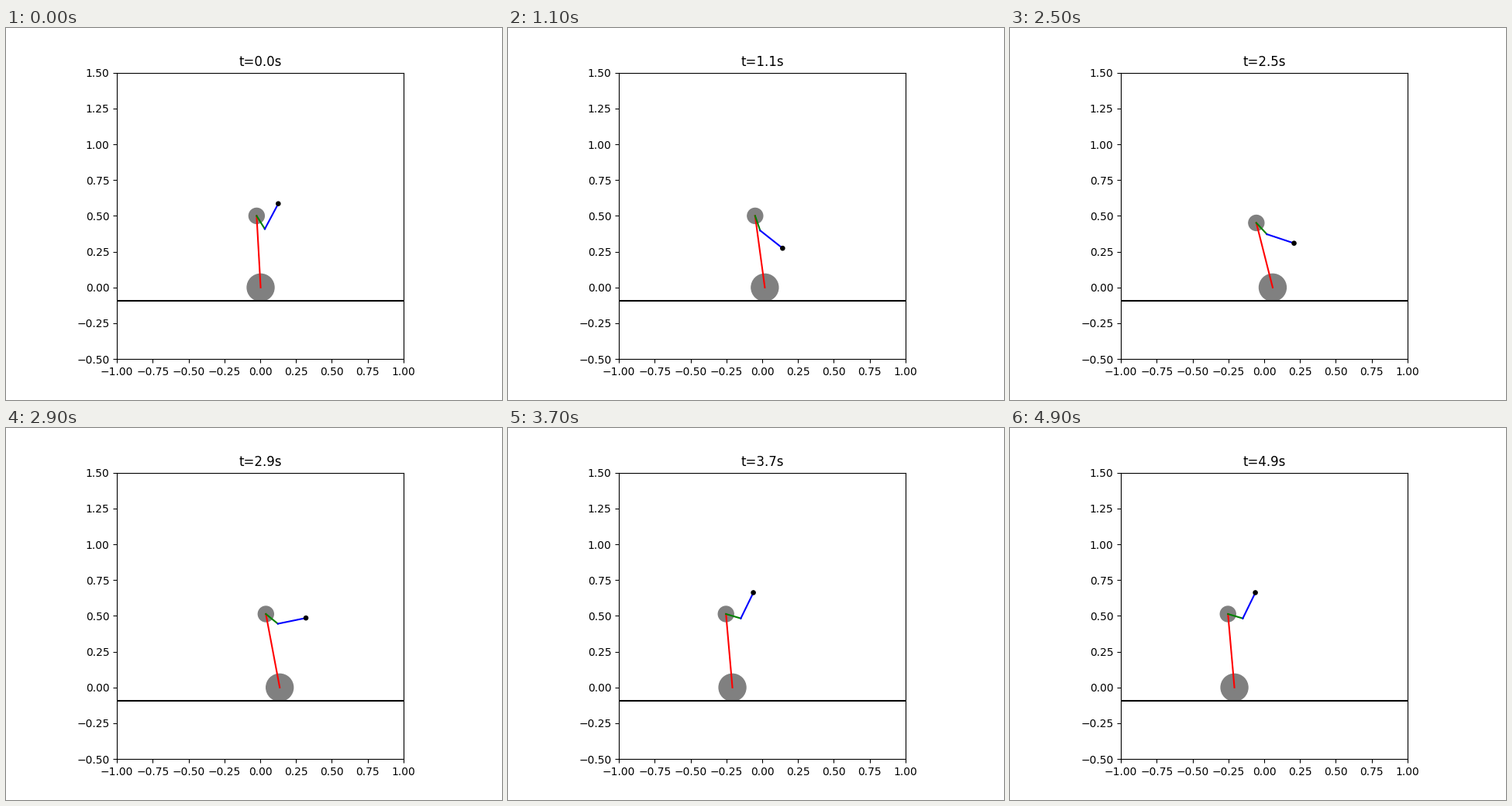
These frames come from a looping animation (640 px wide and 480 px high, 5 s). A matplotlib script:

```python
import numpy as np
import matplotlib.pyplot as plt
from matplotlib.animation import FuncAnimation
from matplotlib.patches import Circle

FRAMES, INTERVAL = 50, 100
WHEEL_R, HIP_R, HAND_R = 0.0945, 0.054, 0.014
LINK, ARM = 0.108, 0.2


def swing(*turns):
    """Motion that eases in and out between (time, value) turning points."""
    times, values = zip(*turns)

    def at(t):
        step = np.interp(t, times, range(len(times)))
        i, u = divmod(step, 1)
        return np.interp(i + u * u * (3 - 2 * u), range(len(values)), values)

    return at


# The wheel rocks to balance while the body crouches, springs up and settles.
wheel_x = swing((0, 0.003), (0.35, -0.077), (1.68, 0.083),
                (2.2, -0.2), (2.7, 0.2), (3.5, -0.208))
hip_x = swing((0, -0.025), (0.6, -0.096), (1.55, -0.01),
              (2.2, -0.16), (2.8, 0.05), (3.7, -0.253))
hip_y = swing((1.2, 0.5), (1.9, 0.215), (2.75, 0.513))
link_angle = swing((0, -58), (1.15, -71), (1.9, -35), (2.5, -47), (3.7, -16.5))
arm_angle = swing((0, 62), (1, -39), (1.9, -20), (2.4, -20), (3.6, 64))


def reach(start, length, degrees):
    a = np.radians(degrees)
    return start + length * np.array([np.cos(a), np.sin(a)])


fig, ax = plt.subplots(figsize=(6.4, 4.8), dpi=100)
ax.set_aspect("equal")
ax.set_xlim(-1, 1)
ax.set_ylim(-0.5, 1.5)
title = ax.set_title("t=0.0s")
ax.plot([-1, 1], [-WHEEL_R, -WHEEL_R], color="black")


def disc(radius, color, **style):
    return ax.add_patch(Circle((0, 0), radius, color=color, **style))


wheel = disc(WHEEL_R, "gray")
hip_disc = disc(HIP_R, "gray")
hand_disc = disc(HAND_R, "black", zorder=3)
leg, link, arm = (ax.plot([], [], color=c)[0] for c in ("red", "green", "blue"))


def connect(line, a, b):
    line.set_data([a[0], b[0]], [a[1], b[1]])


def update(frame):
    t = frame * INTERVAL / 1000
    axle = np.array([wheel_x(t), 0.0])
    hip = np.array([hip_x(t), hip_y(t)])
    elbow = reach(hip, LINK, link_angle(t))
    hand = reach(elbow, ARM, arm_angle(t))

    wheel.center, hip_disc.center, hand_disc.center = axle, hip, hand
    connect(leg, axle, hip)
    connect(link, hip, elbow)
    connect(arm, elbow, hand)
    title.set_text(f"t={t:.1f}s")
    return wheel, hip_disc, hand_disc, leg, link, arm, title


animation = FuncAnimation(fig, update, frames=FRAMES, interval=INTERVAL,
                          repeat=True, repeat_delay=0, blit=False)
plt.show()
```
